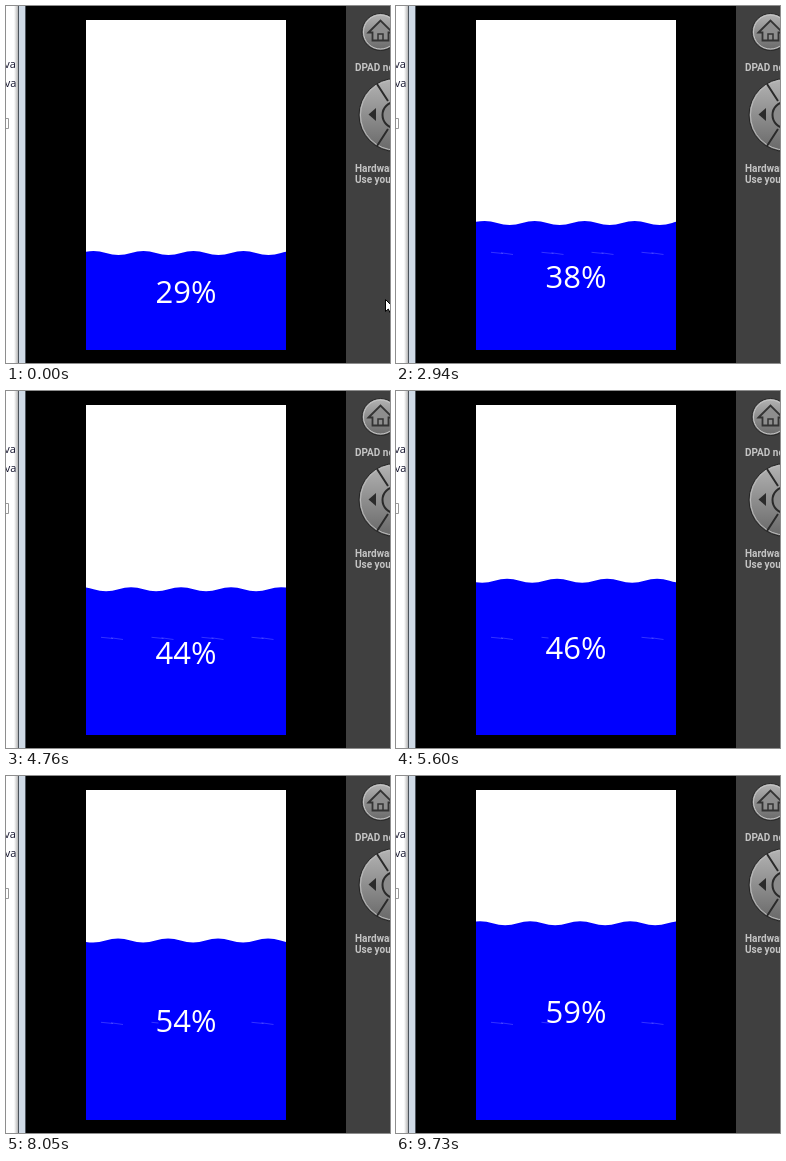
Animation of 384 by 357 pixels, one loop 9800 ms. Source, as an HTML page:

```html
<!DOCTYPE html>
<html lang="en">
<head>
<meta charset="utf-8">
<title>Water level</title>
<style>
  html, body { margin: 0; width: 100%; height: 100%; overflow: hidden; background: #000; }
  svg { display: block; width: 384px; height: 357px; }
  .label { font: bold 10px Roboto, Arial, sans-serif; fill: #c4c4c4; }
  .code { font: 11px "Open Sans", sans-serif; fill: #15152e; text-anchor: end; }
  #percent { font: 31px "Open Sans", "Noto Sans", sans-serif; fill: #fff; text-anchor: middle; }
</style>
</head>
<body>
<svg viewBox="0 0 384 357">
  <defs>
    <linearGradient id="metal" x1="0" y1="0" x2="0" y2="1">
      <stop offset="0" stop-color="#b4b4b4"/>
      <stop offset="1" stop-color="#686868"/>
    </linearGradient>
    <linearGradient id="shade">
      <stop offset="0" stop-color="#fff"/>
      <stop offset="1" stop-color="#b5b5b5"/>
    </linearGradient>
    <clipPath id="tank"><rect x="80" y="14" width="200" height="330"/></clipPath>
  </defs>

  <!-- editor and window edge -->
  <rect width="12" height="357" fill="#fff"/>
  <rect x="8" width="4" height="357" fill="url(#shade)"/>
  <text class="code" x="10" y="62">va</text>
  <text class="code" x="10.5" y="81">va</text>
  <path d="M0 112.5H2.5V122.5H0" fill="none" stroke="#999"/>
  <rect x="12" width="8" height="357" fill="#4d545c"/>
  <rect x="13" width="6" height="357" fill="#cfdae6"/>

  <!-- side panel -->
  <rect x="340" width="44" height="357" fill="#404040"/>
  <circle cx="374.5" cy="26" r="18.5" fill="url(#metal)" stroke="#262626"/>
  <circle cx="374.5" cy="26" r="17" fill="none" stroke="#c6c6c6"/>
  <path d="M362.5 26.5L374.500 14.500L386.500 26.500H382.500V34.500H366.500V26.500Z" fill="#8e8e8e" stroke="#333" stroke-width="1.8"/>
  <path d="M372 34V28H377V34" fill="none" stroke="#333" stroke-width="1.5"/>
  <text class="label" x="349" y="65">DPAD not enabled</text>
  <circle cx="389.500" cy="109" r="36.500" fill="url(#metal)" stroke="#242424"/>
  <circle cx="389.500" cy="109" r="35" fill="none" stroke="#bcbcbc"/>
  <path d="M371 78L382 95M371 140L382 123" stroke="#2a2a2a" stroke-width="2"/>
  <circle cx="389.500" cy="109" r="13" fill="#8a8a8a" stroke="#2a2a2a" stroke-width="2"/>
  <path d="M362.500 108.500L370 102V115Z" fill="#2b2b2b"/>
  <text class="label" x="349" y="166">Hardware Keyboard</text>
  <text class="label" x="349" y="177">Use your physical</text>

  <!-- tank -->
  <rect x="80" y="14" width="200" height="330" fill="#fff"/>
  <g clip-path="url(#tank)">
    <path id="water" fill="#00f"/>
    <path id="glints" fill="none" stroke="#fff" stroke-opacity=".2"/>
  </g>
  <text id="percent" x="180"></text>
  <path id="cursor" d="M379.500 293.500V305.500L382.300 303L384.500 307.500L386.500 306.500L384.500 302H388Z" fill="#fff" stroke="#000"/>
</svg>
<script>
  const STEP = 70, LOOP = 9800;
  const BOTTOM = 344, HEIGHT = 330, START = 247;
  const DRIFT = 7.17, RISE = 0.717;
  const WAVE = 50, CREST = 4;

  const $ = id => document.getElementById(id);
  const water = $("water"), glints = $("glints"), percent = $("percent"), cursor = $("cursor");

  function wavePath(level, shift) {
    const x = 25 + shift;
    const arcs = `q${WAVE / 4} ${-CREST} ${WAVE / 2} 0` + `t${WAVE / 2} 0`.repeat(11);
    return `M${x} ${level}${arcs}V${BOTTOM}H${x}Z`;
  }

  // Faint streaks; the middle pair is wiped once the label has passed over them.
  function glintPath(n) {
    if (n < 3) return "";
    const streak = x => `M${x} 246.300l10 1l2 .2M${x + 10} 246.800l12 1.700`;
    if (n < 73) return [95, 145.500, 195.500, 245.500].map(streak).join("");
    return streak(95) + "M145.500 246.300l7 .7" + streak(245.500);
  }

  function draw(now) {
    const n = Math.floor((now % LOOP) / STEP);
    const level = START - RISE * n;
    water.setAttribute("d", wavePath(level, (DRIFT * n) % WAVE));
    glints.setAttribute("d", glintPath(n));
    percent.textContent = Math.floor((BOTTOM - level) / HEIGHT * 100) + "%";
    percent.setAttribute("y", Math.round((level + BOTTOM) / 2 + 1.5));
    cursor.style.display = n < 1 ? "" : "none";
  }

  const began = performance.now();
  function tick() {
    draw(performance.now() - began);
    requestAnimationFrame(tick);
  }
  tick();
</script>
</body>
</html>
```
